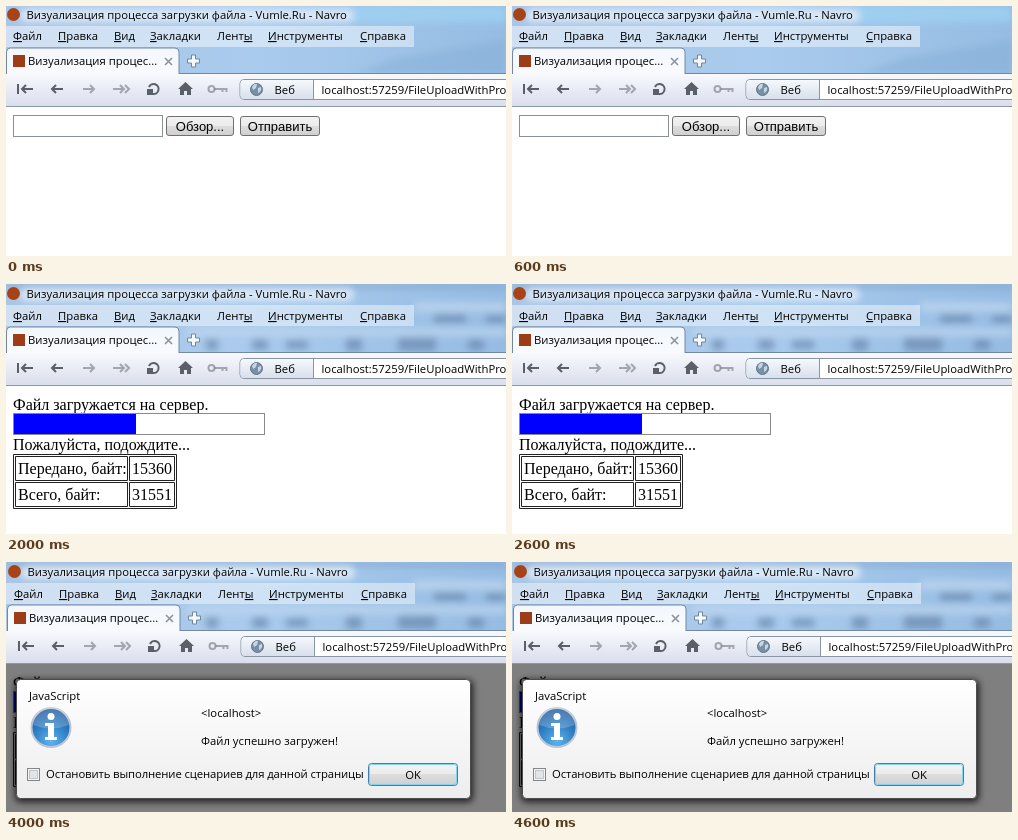
Recreate the animation shown at these times as an HTML page. Size 500 by 250 pixels, loop 5000 ms.

```html
<!DOCTYPE html>
<html lang="ru">
<head>
<meta charset="utf-8">
<title>Загрузка файла</title>
<style>
  html, body { margin: 0; width: 100%; height: 100%; overflow: hidden; background: #fff; }
  svg { display: block; width: 500px; height: 250px; }
  text { white-space: pre; fill: #000; }
  .ui { font: 11.3px "Open Sans", "Noto Sans", sans-serif; }
  .form { font: 13px "Liberation Sans", Arial, sans-serif; }
  .page { font: 16px "Liberation Serif", "Times New Roman", serif; }
  .key { text-decoration: underline; }
  .line { fill: none; stroke: #222; }
  .nav { fill: none; stroke: #5a5f68; stroke-width: 2; }
  .off { opacity: .5; }
</style>
</head>
<body>
<svg viewBox="0 0 500 250">
  <defs>
    <linearGradient id="glass">
      <stop stop-color="#a9c6e6"/><stop offset=".5" stop-color="#a9cbed"/>
      <stop offset="1" stop-color="#96bce3"/>
    </linearGradient>
    <linearGradient id="bar" x2="0" y2="1">
      <stop stop-color="#f7f9fd"/><stop offset="1" stop-color="#dadeec"/>
    </linearGradient>
    <linearGradient id="tab" x2="0" y2="1">
      <stop stop-color="#f3f7fc"/><stop offset="1" stop-color="#f8fafd"/>
    </linearGradient>
    <linearGradient id="badge" x2="0" y2="1">
      <stop stop-color="#f5f8fc"/><stop offset="1" stop-color="#d9e0ec"/>
    </linearGradient>
    <linearGradient id="button" x2="0" y2="1">
      <stop stop-color="#f3f3f3"/><stop offset=".48" stop-color="#ebebeb"/>
      <stop offset=".5" stop-color="#dddddd"/><stop offset="1" stop-color="#cfcfcf"/>
    </linearGradient>
    <linearGradient id="panel" x2="0" y2="1">
      <stop stop-color="#fff"/><stop offset="1" stop-color="#ededed"/>
    </linearGradient>
    <radialGradient id="info" cy=".85" r=".9">
      <stop stop-color="#5fb4ec"/><stop offset=".5" stop-color="#2f7fc4"/><stop offset="1" stop-color="#1b4f92"/>
    </radialGradient>
    <filter id="blur" x="-50%" y="-50%" width="200%" height="200%"><feGaussianBlur stdDeviation="3.5"/></filter>
  </defs>

  <rect width="500" height="102" fill="url(#glass)"/>
  <g id="sky" filter="url(#blur)">
    <path d="M345 0h155v16H345z" fill="#9ed3f3" opacity=".8"/>
    <path d="M390 52l110-18v34H350z" fill="#86add6" opacity=".5"/>
  </g>
  <g id="behind" filter="url(#blur)">
    <path d="M0 0h500v4H0z" fill="#7897bb" opacity=".6"/>
    <path d="M408 18h92v10h-92zM180 44h320v8H180z" fill="#c0d8f0" opacity=".7"/>
    <path d="M428 30h32v9h-32zM480 31h20v8h-20zM200 55h12v11h-12zM246 55h16v11h-16zM280 56h22v9h-22zM340 54h16v13h-16zM392 53h38v14h-38zM462 55h16v11h-16z" fill="#5f7fa6" opacity=".6"/>
  </g>

  <g id="chrome">
    <g class="ui">
      <rect x="14" y="3" width="334" height="13" rx="6" fill="#fff" opacity=".6" filter="url(#blur)"/>
      <rect x="-2" y="20" width="410" height="21" fill="#fff" opacity=".45"/>
      <circle cx="7.500" cy="8.500" r="6.500" fill="#a84318"/>
      <text x="20.500" y="12.500">Визуализация процесса загрузки файла - Vumle.Ru - Navro</text>
      <g id="menu">
        <text x="7" y="34"><tspan class="key">Ф</tspan>айл</text>
        <text x="52" y="34"><tspan class="key">П</tspan>равка</text>
        <text x="108" y="34"><tspan class="key">В</tspan>ид</text>
        <text x="144" y="34"><tspan class="key">З</tspan>акладки</text>
        <text x="211" y="34">Лент<tspan class="key">ы</tspan></text>
        <text x="262" y="34"><tspan class="key">И</tspan>нструменты</text>
        <text x="354" y="34"><tspan class="key">С</tspan>правка</text>
      </g>

      <path d="M.5 68V46q0-4 4-4H169q4 0 4 4V68" fill="url(#tab)" stroke="#7088a6"/>
      <rect x="7" y="49" width="12" height="12" fill="#9c3d17"/>
      <text x="22" y="59">Визуализация процес...</text>
      <path d="M159 52l7 7m0-7l-7 7" stroke="#8b949e" stroke-width="1.600"/>
      <path d="M185.500 49h4v4h4v4h-4v4h-4v-4h-4v-4h4z" fill="#f5f9fd" stroke="#71859c"/>

      <path d="M-2 68h510v32H-2z" fill="url(#bar)"/>
      <path d="M173 67.500h335" stroke="#7088a6"/>
      <g class="nav">
        <path d="M12 78v10M27 83H16m4-4l-4 4 4 4"/>
        <path d="M57 83H46m4-4l-4 4 4 4"/>
        <path class="off" d="M77 83h11m-4-4l4 4-4 4"/>
        <path class="off" d="M107 83h11m-4-4l4 4-4 4m5-8l4 4-4 4"/>
        <path d="M143 81a5 5 0 1 1 4 7"/>
        <path d="M141 89v-6h6v6z" fill="#5a5f68" stroke="none"/>
        <path d="M172 83l7.500-7 7.500 7h-2v6h-4v-4h-3v4h-4v-6z" fill="#5a5f68" stroke="none"/>
        <path class="off" d="M208.500 83h12v3m-4-3v3"/><circle class="off" cx="205.500" cy="83" r="3"/>
      </g>
      <path d="M508 73.500H238q-4 0-4 4v12q0 4 4 4h270" fill="#fff" stroke="#8795a5"/>
      <path d="M307 74H238q-3.500 0-3.500 3.500v12q0 3.500 3.500 3.500h69z" fill="url(#badge)"/>
      <path d="M307.500 74v19" stroke="#8795a5"/>
      <circle cx="250.500" cy="83.500" r="6" fill="#7790a6" stroke="#5f768c"/>
      <path d="M246 81q2-4 5-3l-1 4-3 2zm6 1l3-1q1 4-3 6z" fill="#c8d6e2"/>
      <text x="268.500" y="87.500">Веб</text>
      <text x="315.500" y="87.500">localhost:57259/FileUploadWithPro</text>
    </g>
    <rect x="-2" y="100" width="510" height="150" fill="#fff"/>
    <path d="M-2 100.500h510" stroke="#8c98a6"/>
  </g>

  <g id="form" class="form">
    <rect x="7.500" y="109.500" width="149" height="21" fill="#fff" stroke="#8a8f98"/>
    <g fill="url(#button)" stroke="#707070">
      <rect x="160.500" y="110.500" width="67" height="19" rx="2.500"/>
      <rect x="234.500" y="110.500" width="79" height="19" rx="2.500"/>
    </g>
    <text x="194" y="125" text-anchor="middle">Обзор...</text>
    <text x="274" y="125" text-anchor="middle">Отправить</text>
  </g>

  <g id="progress" class="page">
    <text x="7" y="126">Файл загружается на сервер.</text>
    <rect x="7.500" y="129.500" width="251" height="21" fill="#fff" stroke="#8a8a8a"/>
    <rect id="fill" x="8" y="130" height="20" fill="#00f"/>
    <text x="7" y="166">Пожалуйста, подождите...</text>
    <path class="line" d="M7.500 170.500h163v54H7.500zM9.500 172.500h112v24H9.500zM123.500 172.500h45v24h-45zM9.500 198.500h112v24H9.500zM123.500 198.500h45v24h-45z"/>
    <text x="12" y="190">Передано, байт:</text>
    <text x="126" y="190" id="sent"></text>
    <text x="12" y="216">Всего, байт:</text>
    <text x="126" y="216" id="total"></text>
  </g>

  <g id="dialog" class="ui">
    <rect y="102" width="500" height="148" opacity=".5"/>
    <rect x="9" y="118" width="458" height="122" rx="5" filter="url(#blur)" opacity=".75"/>
    <rect x="10.500" y="117.500" width="454" height="119" rx="4" fill="url(#panel)" stroke="#4c4c4c"/>
    <text x="23" y="138">JavaScript</text>
    <circle cx="45" cy="165.500" r="19.500" fill="url(#info)" stroke="#b8c6d6" stroke-width="2"/>
    <path d="M27 163a18 18 0 0 1 36 0q-18 7-36 0z" fill="#fff" opacity=".2"/>
    <circle cx="45" cy="154.500" r="3.500" fill="#fff"/>
    <path d="M39 161h9v14h3v3H39v-3h3v-11h-3z" fill="#fff"/>
    <text x="195" y="155">&lt;localhost&gt;</text>
    <text x="195" y="183">Файл успешно загружен!</text>
    <rect x="21.500" y="206.500" width="12" height="12" fill="#f4f4f4" stroke="#858585"/>
    <rect x="23.500" y="208.500" width="8" height="8" fill="#e2e5e8" stroke="#bfc5cb"/>
    <text x="40" y="216" letter-spacing="-.1">Остановить выполнение сценариев для данной страницы</text>
    <rect x="362.500" y="201.500" width="89" height="22" rx="3" fill="url(#button)" stroke="#3c7fb1"/>
    <rect x="363.500" y="202.500" width="87" height="20" rx="2" fill="none" stroke="#7fd3f3"/>
    <text x="407" y="217" text-anchor="middle">OK</text>
  </g>
</svg>
<script>
const $ = id => document.getElementById(id);
const show = (id, on) => $(id).style.display = on ? "" : "none";
const shift = (id, x, y) => $(id).setAttribute("transform", `translate(${x} ${y})`);
const total = 31551, barWidth = 250;
const sentAt = [0, 1024, 15360, 24576, total];
let last = -1;

function draw(step) {
  const sent = sentAt[step], loading = step > 0, done = step === 4;
  show("sky", !loading);
  show("behind", loading);
  show("form", !loading);
  show("progress", loading);
  show("dialog", done);
  shift("chrome", +done, +loading);
  shift("menu", 0, +loading);
  $("fill").setAttribute("width", Math.round(barWidth * sent / total));
  $("sent").textContent = sent;
  $("total").textContent = total;
}

function tick() {
  const step = Math.floor(performance.now() / 1000) % sentAt.length;
  if (step !== last) draw(last = step);
  requestAnimationFrame(tick);
}
tick();
</script>
</body>
</html>
```
